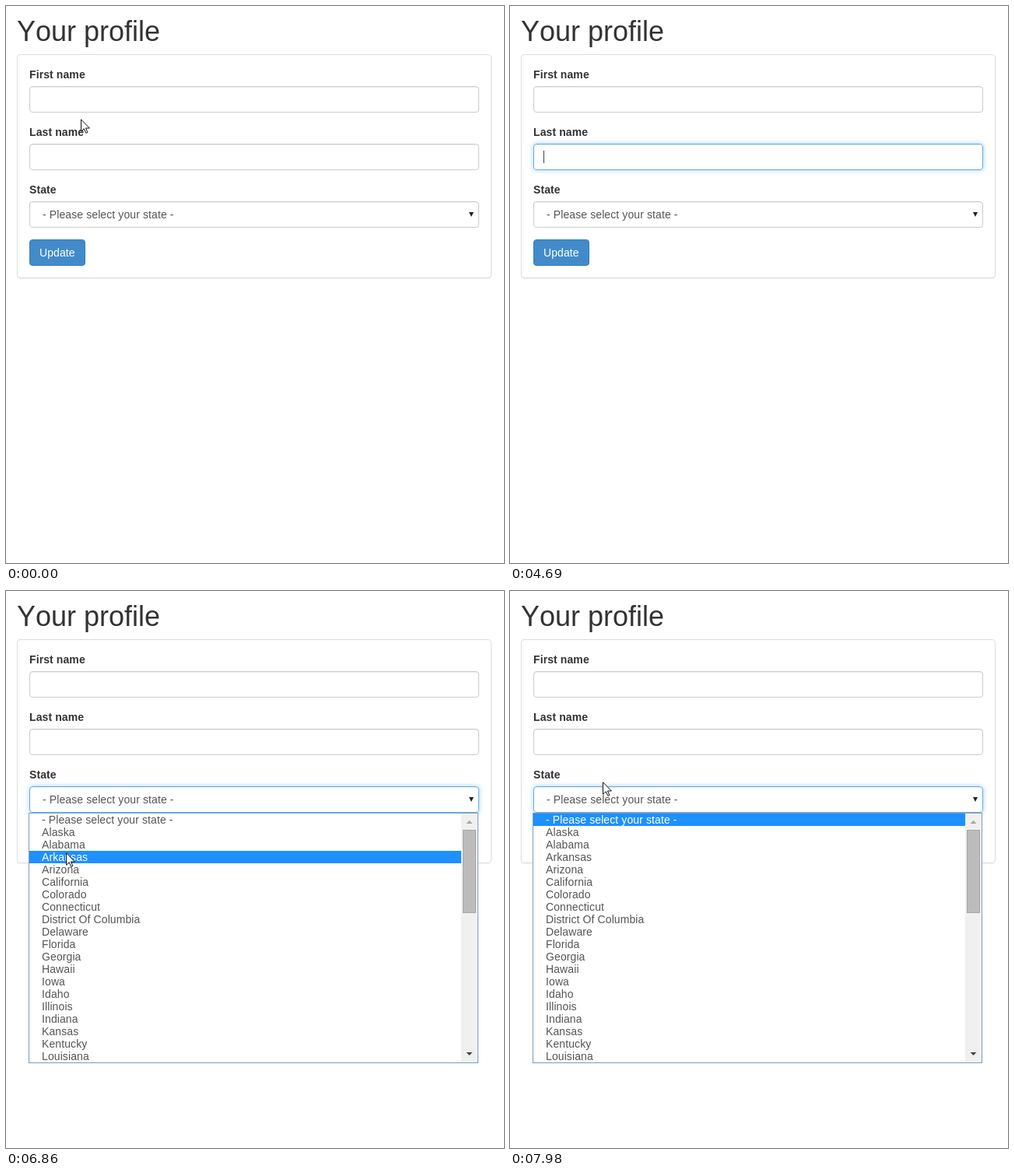
Write an HTML page that moves like this. It is 640 px wide and 716 px high and loops after 8000 ms.

```html
<!DOCTYPE html>
<html lang="en">
<head>
<meta charset="utf-8">
<title>Your profile</title>
<style>
html, body { margin: 0; width: 100%; height: 100%; overflow: hidden; background: #fff; }
body { position: relative; font: 14px/20px "Liberation Sans", Arial, sans-serif; font-kerning: none; letter-spacing: .1px; color: #333; }
body *, svg { position: absolute; box-sizing: border-box; margin: 0; white-space: nowrap; }
h1 { left: 14px; top: 13px; font-size: 36px; line-height: 39.6px; font-weight: 400; letter-spacing: 0; }
.panel { left: 14px; top: 62px; width: 610px; height: 288px; border: 1px solid #ddd; border-radius: 4px; box-shadow: 0 1px 1px rgb(0 0 0 / .05); }
label { left: 30px; font-weight: 700; }
.field {
  --focus: 0%;
  left: 30px; width: 578px; height: 34px; padding: 6px 16px; border: 1px solid; border-radius: 4px; color: #555;
  border-color: color-mix(in srgb, #66afe9 var(--focus), #ccc);
  box-shadow: inset 0 1px 1px rgb(0 0 0 / .075), 0 0 6px color-mix(in srgb, rgb(102 175 233 / .6) var(--focus), transparent);
}
.button { left: 30px; top: 300px; width: 72px; height: 34px; padding: 6px 12px; border: 1px solid #357ebd; border-radius: 4px; background: #428bca; color: #fff; }
.menu { left: 29px; top: 285px; width: 578px; height: 322px; border: 1px solid #7a9cbd; background: #fff; overflow: hidden; }
.option { left: 0; width: 555px; height: 16px; padding-left: 16px; line-height: 16px; color: #555; }
.option.active { background: #1e90ff; color: #fff; }
.track { left: 555px; top: 0; width: 21px; height: 320px; background: #f0f0f0; }
.thumb { left: 2px; top: 21px; width: 17px; height: 107px; background: #bcbcbc; border: 1px solid #a6a6a6; }
.caret { left: 43px; width: 1px; height: 16px; background: #444; }
svg { left: 0; top: 0; overflow: visible; }
</style>
</head>
<body>
<h1>Your profile</h1>
<div class="panel"></div>
<label style="top:78px">First name</label>
<label style="top:152px">Last name</label>
<label style="top:226px">State</label>
<div class="field" style="top:103px"></div>
<div class="field" style="top:177px"></div>
<div class="field" style="top:251px">- Please select your state -</div>
<svg width="1" height="1"><path d="M595 265h6l-3 6z" fill="#222"/></svg>
<div class="button">Update</div>
<div class="caret"></div>
<svg id="beam" width="1" height="1"><path d="M53 109.5h6M56 110v13M53 123.5h6" stroke="#000" opacity=".04"/></svg>
<div class="menu">
  <div class="track">
    <div class="thumb"></div>
    <svg width="1" height="1"><path d="M6.5 13h8l-4-4z" fill="#a3a3a3"/><path d="M6.5 307h8l-4 4z" fill="#404040"/></svg>
  </div>
</div>
<svg id="pointer" width="12" height="19"><path d="M.5.8V16.3L4.2 12.8 6.8 18.4 8.9 17.5 6.4 12H11.4Z" fill="#fff" stroke="#111"/></svg>
<script>
const LOOP = 8000, STEP = 70, BLINK = 490, ROW = 16, MENU_TOP = 286;
const FIRST = 2240, LAST = 4550, STATE = 5740;
const states = ['- Please select your state -', 'Alaska', 'Alabama', 'Arkansas', 'Arizona', 'California',
  'Colorado', 'Connecticut', 'District Of Columbia', 'Delaware', 'Florida', 'Georgia', 'Hawaii', 'Iowa',
  'Idaho', 'Illinois', 'Indiana', 'Kansas', 'Kentucky', 'Louisiana'];

const linear = p => p;
const smooth = p => p * p * (3 - 2 * p);
const accelerate = p => p ** 1.8;

// The pointer glides from stop to stop and rests in between
const home = { x: 96, y: 145 };
const glides = [
  { start: 0, end: 70, x: 88, y: 138, ease: linear },
  { start: 840, end: 1050, x: 83, y: 151, ease: linear },
  { start: 1120, end: 1540, x: 61, y: 134, ease: linear },
  { start: 1540, end: 5110, x: 78, y: 212, ease: linear },
  { start: 5110, end: 5460, x: 67, y: 260, ease: linear },
  { start: 6090, end: 6720, x: 77, y: 332, ease: smooth },
  { start: 6790, end: 7350, x: 85, y: 504, ease: accelerate },
  { start: 7420, end: 7980, x: 119, y: 245, ease: smooth }
];

const $ = selector => document.querySelector(selector);
const fields = document.querySelectorAll('.field');
const menu = $('.menu'), caret = $('.caret'), pointer = $('#pointer'), beam = $('#beam');
const options = states.map((name, i) => {
  const option = document.createElement('div');
  option.className = 'option';
  option.textContent = name;
  option.style.top = i * ROW + 'px';
  menu.append(option);
  return option;
});

const clamp = p => Math.min(1, Math.max(0, p));
const show = (element, visible) => element.style.visibility = visible ? 'visible' : 'hidden';

function tipAt(t) {
  let { x, y } = home;
  for (const glide of glides) {
    const p = glide.ease(clamp((t - glide.start) / (glide.end - glide.start)));
    x += (glide.x - x) * p;
    y += (glide.y - y) * p;
  }
  return { x, y };
}

const fade = (t, start) => 1 - (1 - clamp((t - start + 20) / 150)) ** 2;

function render(t) {
  const focus = [FIRST, LAST, STATE].map(start => fade(t, start));
  fields.forEach((field, i) => {
    field.style.setProperty('--focus', 100 * (focus[i] - (focus[i + 1] || 0)) + '%');
  });

  const start = t < LAST ? FIRST : LAST;
  caret.style.top = (t < LAST ? 112 : 186) + 'px';
  show(caret, t >= FIRST && t < STATE && Math.floor((t - start) / BLINK) % 2 === 0);
  show(beam, t >= FIRST && t < LAST);

  const { x, y } = tipAt(t);
  pointer.style.transform = `translate(${Math.round(x)}px, ${Math.round(y)}px)`;
  show(pointer, t < 1540 || t >= 5110);

  show(menu, t >= STATE);
  // The highlight trails the pointer slightly
  const hovered = Math.max(0, Math.floor((tipAt(t - 12).y - MENU_TOP) / ROW));
  options.forEach((option, i) => option.classList.toggle('active', i === hovered));
}

const origin = performance.now();
function tick() {
  const t = (performance.now() - origin) % LOOP;
  render(Math.floor(t / STEP) * STEP);
  requestAnimationFrame(tick);
}
tick();
</script>
</body>
</html>
```
